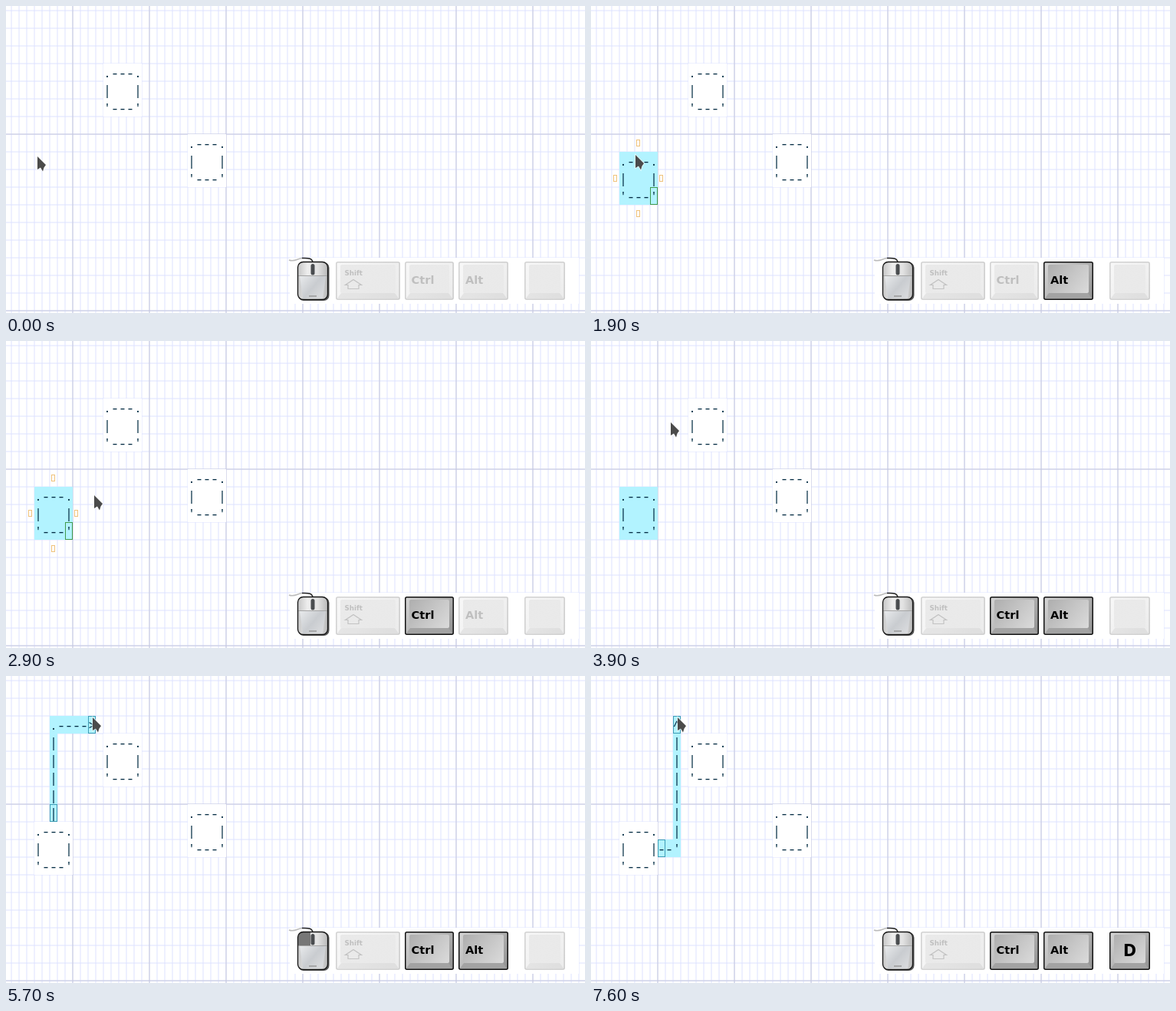
Write an HTML page with a canvas that moves like this. It is 755 by 400 pixels and loops after 8 s.

```html
<!DOCTYPE html>
<html lang="en">
<head>
<meta charset="utf-8">
<title>Diagram editor</title>
<style>
html, body { margin: 0; width: 100%; height: 100%; overflow: hidden; background: #fff; }
canvas { display: block; }
</style>
</head>
<body>
<canvas id="stage" width="755" height="400"></canvas>
<script>
const ctx = document.getElementById('stage').getContext('2d');
const W = 755, H = 400, LOOP = 8000, STEP = 100;
const CW = 10, CH = 23;
const SELECTED = '#b2f3ff';
const BOX = [".---.", "|   |", "'---'"];

// Pointer tip: time, x, y
const PATH = [
  [1800, 41, 196], [1900, 58, 194], [2000, 69, 195], [2200, 86, 199], [2400, 95, 200],
  [2600, 95, 200], [2700, 102, 201], [2900, 115, 201], [3600, 115, 201], [3700, 113, 186],
  [3900, 104, 106], [4000, 103, 93], [4200, 105, 78], [4500, 112, 61], [4700, 113, 54]
];

function pointerAt(t) {
  if (t <= PATH[0][0]) return PATH[0].slice(1);
  for (let i = 1; i < PATH.length; i++) {
    const [t0, x0, y0] = PATH[i - 1], [t1, x1, y1] = PATH[i];
    if (t <= t1) {
      const k = (t - t0) / (t1 - t0);
      return [Math.round(x0 + (x1 - x0) * k), Math.round(y0 + (y1 - y0) * k)];
    }
  }
  return PATH[PATH.length - 1].slice(1);
}

function line(x0, y0, x1, y1, color, width = 1) {
  ctx.strokeStyle = color;
  ctx.lineWidth = width;
  ctx.beginPath();
  ctx.moveTo(x0, y0);
  ctx.lineTo(x1, y1);
  ctx.stroke();
}

function polygon(points) {
  ctx.beginPath();
  points.forEach(([x, y]) => ctx.lineTo(x, y));
  ctx.closePath();
}

function roundRect(x, y, w, h, r) {
  ctx.beginPath();
  ctx.roundRect(x, y, w, h, r);
}

function gradient(x0, y0, x1, y1, ...colors) {
  const g = ctx.createLinearGradient(x0, y0, x1, y1);
  colors.forEach((c, i) => g.addColorStop(i / (colors.length - 1), c));
  return g;
}

function drawGrid() {
  const minor = '#dde2ff', major = '#c6c8dc';
  for (let x = 7; x < W; x += CW) line(x, 0, x, H, minor);
  for (let y = 6; y < H; y += CH) line(0, y, W, y, minor);
  for (let x = 87; x < W; x += 10 * CW) line(x, 0, x, H, major);
  for (let y = 167; y < H; y += 10 * CH) line(0, y, W, y, major);
}

// Each non-empty row is a filled strip of character cells
function cells(x, y, rows, fill) {
  ctx.font = '16.67px "Noto Sans Mono", monospace';
  ctx.textAlign = 'left';
  rows.forEach((row, r) => {
    const top = y + r * CH;
    ctx.fillStyle = fill;
    ctx.fillRect(x, top, row.length * CW, CH);
    ctx.fillStyle = '#002b42';
    [...row].forEach((c, i) => {
      if (c !== ' ') ctx.fillText(c, x + i * CW, top + 18);
    });
  });
}

function frameCell(x, y, color) {
  ctx.strokeStyle = color;
  ctx.lineWidth = 1;
  ctx.strokeRect(x + 0.5, y + 0.5, CW - 1, CH - 1);
}

function drawHandles() {
  ctx.strokeStyle = '#efc27c';
  ctx.lineWidth = 1;
  for (const [x, y] of [[59, 174], [29, 220], [89, 220], [59, 266]])
    ctx.strokeRect(x + 0.5, y + 0.5, 4, 8);
  frameCell(77, 236, '#3f9a4c');
}

function drawConnector(t) {
  const edge = '#3d9db5';
  const bars = n => Array(n).fill('|');
  if (t < 7600) {
    cells(57, 52, ['.---->', ...bars(5)], SELECTED);
    frameCell(57, 167, edge);
  } else {
    cells(107, 52, ['^', ...bars(6)], SELECTED);
    cells(87, 213, ["--'"], SELECTED);
    frameCell(87, 213, edge);
  }
  frameCell(107, 52, edge);
}

function drawMouse(pressed) {
  ctx.strokeStyle = '#bbb';
  ctx.lineWidth = 1.5;
  ctx.beginPath();
  ctx.moveTo(369, 331);
  ctx.bezierCurveTo(376, 334, 380, 329, 386, 328.5);
  ctx.stroke();
  ctx.strokeStyle = '#222';
  ctx.beginPath();
  ctx.moveTo(386, 328.5);
  ctx.bezierCurveTo(395, 328, 400, 329, 400, 335);
  ctx.stroke();

  ctx.fillStyle = '#555';
  roundRect(381, 334, 40.5, 50, 7);
  ctx.fill();
  roundRect(380.5, 333.5, 39, 49, 7);
  ctx.fillStyle = gradient(380, 0, 420, 0, '#c4c4c4', '#eeeeee', '#e2e2e2', '#b8b8b8');
  ctx.fill();
  ctx.save();
  ctx.clip();
  if (pressed) {
    ctx.fillStyle = '#777';
    ctx.fillRect(381, 333, 16, 18);
  }
  polygon([[383, 352], [417, 352], [413, 381], [387, 381]]);
  ctx.fillStyle = gradient(383, 352, 417, 381, '#e8eaec', '#c9ccd0', '#dedfe1');
  ctx.fill();
  ctx.restore();
  line(381, 351.5, 419, 351.5, '#a5a5a5');
  line(395, 378, 405, 378, '#999', 1.5);
  roundRect(380.5, 333.5, 39, 49, 7);
  ctx.strokeStyle = '#151515';
  ctx.lineWidth = 1.3;
  ctx.stroke();
  roundRect(397.5, 336, 5, 14.5, 2.5);
  ctx.fillStyle = '#4a4d50';
  ctx.fill();
}

function drawKey(x, w, lit, label) {
  const y = 333, h = 50;
  ctx.save();
  ctx.globalAlpha = lit ? 1 : 0.18;
  roundRect(x + 0.75, y + 0.75, w - 1.5, h - 1.5, 2);
  ctx.fillStyle = gradient(x, y, x + w, y + h, '#d6d6d6', '#b5b5b5', '#8f8f8f');
  ctx.fill();
  ctx.strokeStyle = '#111';
  ctx.lineWidth = 1.5;
  ctx.stroke();
  // Bevel below the raised face
  polygon([[x + 2, y + h - 2], [x + 7, y + h - 9], [x + w - 7, y + h - 9], [x + w - 2, y + h - 2]]);
  ctx.fillStyle = '#a3a3a3';
  ctx.fill();
  roundRect(x + 6, y + 4, w - 12, h - 13, 2);
  ctx.fillStyle = gradient(x, y, x + w, y + h, '#a9a9a9', '#c6c6c6', '#e2e2e2');
  ctx.fill();
  ctx.fillStyle = '#000';
  if (label) label();
  ctx.restore();
}

function keyText(text, size, x, y, align = 'left') {
  ctx.font = `bold ${size}px "DejaVu Sans", sans-serif`;
  ctx.textAlign = align;
  ctx.fillText(text, x, y);
}

function shiftLabel() {
  keyText('Shift', 8.7, 441.5, 351);
  polygon([[453, 356.5], [463.5, 363.5], [460, 363.5], [460, 368.5],
    [446, 368.5], [446, 363.5], [442.5, 363.5]]);
  ctx.lineWidth = 1.2;
  ctx.stroke();
}

function drawKeys(t) {
  ctx.fillStyle = '#fff';
  ctx.fillRect(370, 328, 377, 60);
  drawMouse((t >= 1300 && t < 1600) || (t >= 5700 && t < 5900));
  const alt = (t >= 500 && t < 2200) || t >= 3400;
  const d = t >= 7600;
  drawKey(430, 84, false, shiftLabel);
  drawKey(520, 64, t >= 2800, () => keyText('Ctrl', 14.6, 528.5, 362));
  drawKey(590, 65, alt, () => keyText('Alt', 14.6, 599, 362));
  drawKey(676, 53, d, d && (() => keyText('D', 20.5, 702.5, 365, 'center')));
}

function drawPointer(t) {
  const [x, y] = pointerAt(t);
  polygon([[0, 0], [0, 17], [4, 14.5], [7, 19.5], [8.5, 14.5], [11, 11]]
    .map(([dx, dy]) => [x + dx, y + dy]));
  ctx.strokeStyle = 'rgba(255,255,255,.7)';
  ctx.lineWidth = 1.6;
  ctx.stroke();
  ctx.fillStyle = '#4b4b4b';
  ctx.fill();
}

function draw(t) {
  ctx.fillStyle = '#fff';
  ctx.fillRect(0, 0, W, H);
  drawGrid();
  cells(127, 75, BOX, '#fff');
  cells(237, 167, BOX, '#fff');
  if (t >= 1400) cells(37, 190, BOX, t < 5700 ? SELECTED : '#fff');
  if (t >= 1400 && t < 3400) drawHandles();
  if (t >= 5700) drawConnector(t);
  drawKeys(t);
  drawPointer(t);
}

const start = performance.now();
function tick() {
  const t = Math.max(0, performance.now() - start) % LOOP;
  draw(Math.floor(t / STEP) * STEP);
  requestAnimationFrame(tick);
}
tick();
</script>
</body>
</html>
```
